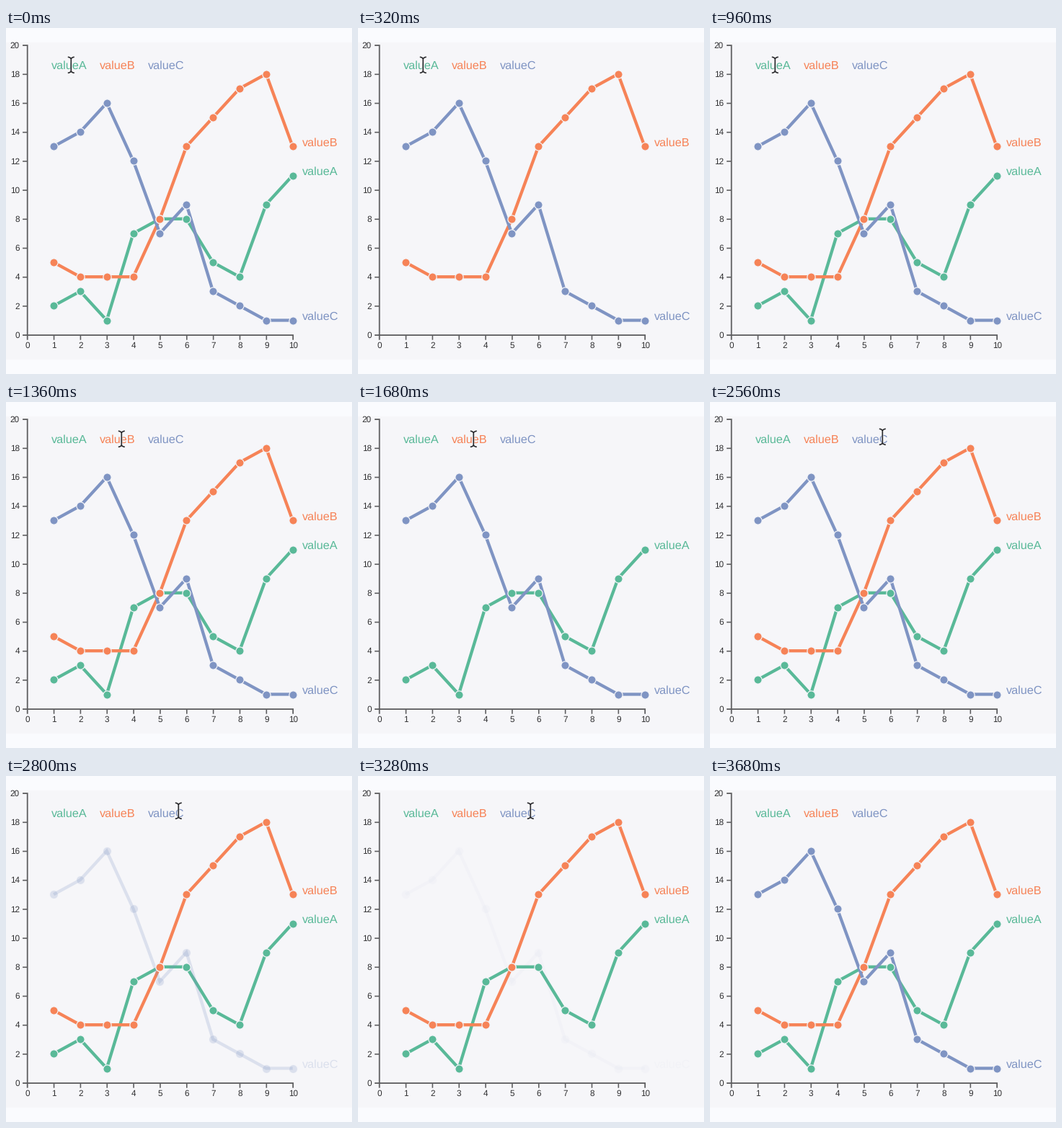
A matplotlib script that plays this animation: 480x480 px, repeating every 4.08 s.

```python
import matplotlib.pyplot as plt
import numpy as np
from matplotlib.animation import FuncAnimation
from matplotlib.patches import Polygon, Rectangle

SIZE, DPI = 480, 96
PT = 72 / DPI  # points per pixel
STEP, FRAMES = 80, 51
FADE = 250  # ms
PANEL, INK, DIGITS = "#f6f6f9", "#5c5c5e", "#303032"

plt.rcParams["font.family"] = "Liberation Sans"
plt.rcParams["text.hinting"] = "none"

# name: colour, data, fade-out start, fade-in start
SERIES = {
    "valueA": ("#59b998", [2, 3, 1, 7, 8, 8, 5, 4, 9, 11], 50, 740),
    "valueB": ("#f68357", [5, 4, 4, 4, 8, 13, 15, 17, 18, 13], 1420, 2010),
    "valueC": ("#7f94c3", [13, 14, 16, 12, 7, 9, 3, 2, 1, 1], 2645, 3230),
}
LEGEND_X = [62.5 + 67 * i for i in range(len(SERIES))]
TEXT_WIDTH = 49

# cursor glides: start, end, offset
START = np.array([90, 51])
GLIDES = [(960, 1280, (70, 0)), (2095, 2560, (79, -3)), (3440, 3680, (241, 20))]

ARROW = 1.22 * np.array([(0, 0), (0, 17.5), (4, 13.8), (6.6, 19.8), (9.2, 18.7),
                         (6.6, 12.8), (12, 12.4)])


def beam_shape():
    x = np.linspace(-4.5, 4.5, 9)
    y = 11 - 2 * (1 - abs(x) / 4.5)**2
    gap = [np.nan]
    return np.column_stack([np.concatenate([x, gap, [0, 0], gap, x]),
                            np.concatenate([y, gap, [9, -9], gap, -y])])


BEAM = beam_shape()


def px(value):
    return 29.2 + 36.85 * np.asarray(value)


def py(value):
    return 425.6 - 20.1 * np.asarray(value)


def progress(t, start, length):
    return min(max((t - start) / length, 0), 1)


def ease(p):
    return 4 * p**3 if p < 0.5 else 1 - 4 * (1 - p)**3


def opacity(t, hide, show):
    return 1 - ease(progress(t, hide, FADE)) + ease(progress(t, show, FADE))


def cursor(t):
    return START + sum(np.sin(np.pi / 2 * progress(t, start, end - start))
                       * np.array(offset) for start, end, offset in GLIDES)


def over_legend(x):
    return any(left + 2 < x < left + TEXT_WIDTH for left in LEGEND_X)


fig = plt.figure(figsize=(SIZE / DPI, SIZE / DPI), dpi=DPI, facecolor="#fafbfe")
ax = fig.add_axes([0, 0, 1, 1])
ax.set(xlim=(0, SIZE), ylim=(SIZE, 0))
ax.axis("off")
ax.add_patch(Rectangle((0, 20), SIZE, 440, color=PANEL, lw=0, zorder=0))


def stroke(xs, ys, width, color, **kw):
    return ax.plot(xs, ys, color=color, lw=width * PT, snap=False,
                   solid_capstyle="butt", solid_joinstyle="miter", **kw)[0]


def label(x, y, text, size, color, **kw):
    return ax.text(x, y, text, fontsize=size * PT, color=color, **kw)


def draw_axes():
    shift, tick = 0.5, 6.6
    left, right = px(0) + shift, px(10) + shift
    top, bottom = py(20) + shift, py(0) + shift
    stroke([left - tick, left, left, left - tick], [top, top, bottom, bottom], 1.8, INK)
    stroke([left, left, right, right],
           [bottom + tick, bottom, bottom, bottom + tick], 1.8, INK)
    for v in range(2, 20, 2):
        stroke([left - tick, left], [py(v) + shift] * 2, 1.6, INK)
    for v in range(1, 10):
        stroke([px(v) + shift] * 2, [bottom, bottom + tick], 1.6, INK)
    for v in range(0, 21, 2):
        label(18.8, py(v) + 4.2, str(v), 11.8, DIGITS, ha="right")
    for v in range(11):
        label(px(v) + shift, 444.2, str(v), 11.8, DIGITS, ha="center")


draw_axes()
xs = px(range(1, 11))
groups = []
for left, (name, (color, data, hide, show)) in zip(LEGEND_X, SERIES.items()):
    ys = py(data)
    line = stroke(xs, ys, 4.3, color, zorder=2)
    dots = ax.plot(xs, ys, "o", ms=11.2 * PT, mfc=color, mec="#f4f5f9",
                   mew=1.2 * PT, snap=False, zorder=3)[0]
    tag = label(411.2, ys[-1] - 0.2, name, 16.2, color, zorder=4)
    label(left, 57.2, name, 16.2, color, zorder=4)
    groups.append(((line, dots, tag), hide, show))

beam_halo = stroke([], [], 3.2, "white", zorder=6, alpha=0.6)
beam = stroke([], [], 1.7, "#2c2c30", zorder=7)
arrow = ax.add_patch(Polygon(ARROW, fc="#0c0c0c", ec="white", lw=1.4 * PT, zorder=7))


def update(frame):
    t = frame * STEP
    for artists, hide, show in groups:
        for artist in artists:
            artist.set_alpha(opacity(t, hide, show))
    pos = cursor(t)
    visible = t < GLIDES[-1][1]
    text_mode = over_legend(pos[0])
    for part in (beam, beam_halo):
        part.set_data(*(BEAM + pos + 0.3).T)
        part.set_visible(visible and text_mode)
    arrow.set_xy(ARROW + pos)
    arrow.set_visible(visible and not text_mode)
    return []


anim = FuncAnimation(fig, update, frames=FRAMES, interval=STEP, repeat=True,
                     repeat_delay=0, blit=False)
plt.show()
```
